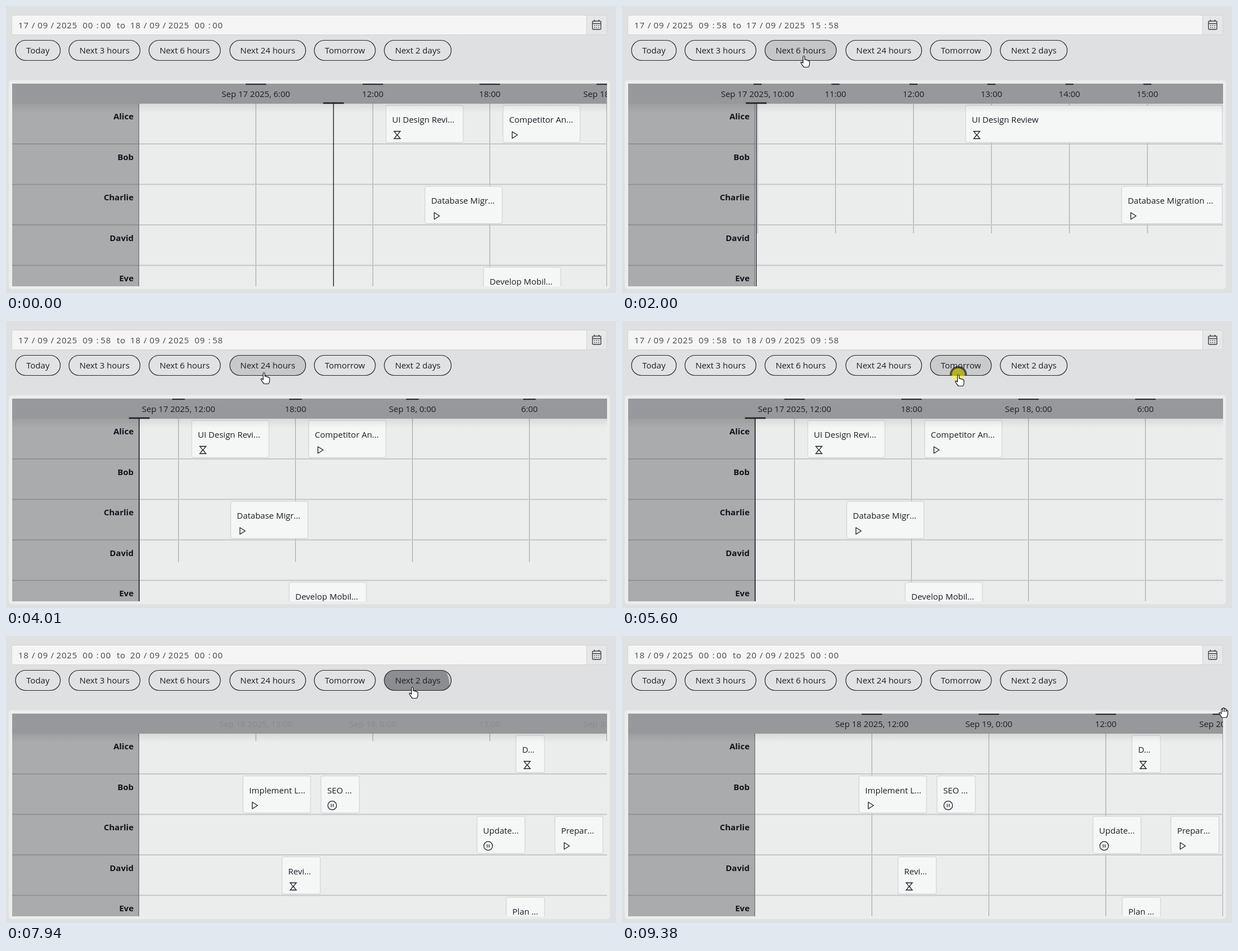
These frames come from a looping animation (1090 px wide and 514 px high, 9.45 s). An HTML page with a canvas:

```html
<!DOCTYPE html>
<html lang="en">
<head>
<meta charset="utf-8">
<title>Task schedule</title>
<style>
html, body { margin: 0; width: 100%; height: 100%; overflow: hidden; background: #dfe0e2; }
canvas { display: block; }
</style>
</head>
<body>
<canvas id="stage" width="1090" height="514"></canvas>
<script>
const ctx = document.getElementById('stage').getContext('2d');
const LOOP = 9450, LEFT = 237.5, RIGHT = 1073.5, TOP = 174.5, ROW = 72.5, BOTTOM = 502;
const INK = '#1c1e26', FONT = '"Open Sans", "Noto Sans", sans-serif';
const NOW = 9 + 59 / 60, START = 9 + 58 / 60;

const people = ['Alice', 'Bob', 'Charlie', 'David', 'Eve'];
const buttons = [
  [17, 80, 'Today'], [112.5, 127, 'Next 3 hours'], [255.5, 127.5, 'Next 6 hours'],
  [400, 135.5, 'Next 24 hours'], [551, 109, 'Tomorrow'], [676, 119.5, 'Next 2 days']
];
// Hours count from 17 September, 0:00
const views = [
  { start: 0, span: 24, step: 6 },
  { start: START, span: 6, step: 1 },
  { start: START, span: 24, step: 6 },
  { start: 24, span: 24, step: 6 },
  { start: 24, span: 48, step: 12 }
];
// row, start, length, icon, label in a day view, label in other views
const tasks = [
  [0, 12, 4, 'wait', 'UI Design Revi...', 'UI Design Review'],
  [0, 18, 4, 'play', 'Competitor An...'],
  [2, 14, 4, 'play', 'Database Migr...', 'Database Migration ...'],
  [4, 17, 4, 'play', 'Develop Mobil...'],
  [1, 34, 7, 'play', 'Implement Login Feature', 'Implement L...'],
  [1, 42, 4, 'pause', 'SEO Optimizat...', 'SEO ...'],
  [3, 38, 4, 'wait', 'Review UI Con...', 'Revi...'],
  [0, 62, 3, 'wait', '', 'D...'],
  [2, 58, 5, 'pause', '', 'Update...'],
  [2, 66, 5, 'play', '', 'Prepar...'],
  [4, 61, 4, 'wait', '', 'Plan ...']
];
const clicks = [1643, 3613, 5580, 7850];
const UPDATE_DELAY = 77;
// begin, end, from, bend, to, exponent of the ease-out
const moves = [
  [70, 980, [1065, 298], [930, 150], [768, 107], 1],
  [980, 1260, [768, 107], [540, 102], [325, 89], 1.5],
  [2520, 3470, [325, 89], [390, 122], [461, 92], 2],
  [4450, 5400, [461, 92], [530, 112], [601, 96], 2],
  [6850, 7580, [601, 96], [672, 108], [726, 91], 2],
  [8720, 9380, [726, 91], [950, 200], [1075, 137], 1.5]
];
const icons = {
  play: new Path2D('M-3.5 -6L6 0L-3.5 6Z'),
  wait: new Path2D('M-6.5 -6.5H6.5M-6.5 6.5H6.5M-4.5 -6.5C-4.5 -2 4.5 2 4.5 6.5M4.5 -6.5C4.5 -2 -4.5 2 -4.5 6.5'),
  pause: new Path2D('M7.8 0A7.8 7.8 0 1 1 -7.8 0A7.8 7.8 0 1 1 7.8 0M-1.7 -2.8V2.8M1.7 -2.8V2.8'),
  calendar: new Path2D('M-5.5 -7H5.5Q7.5 -7 7.5 -5V6Q7.5 8 5.5 8H-5.5Q-7.5 8 -7.5 6V-5Q-7.5 -7 -5.5 -7ZM-7.5 -2.5H7.5M-4 -9.5V-6M4 -9.5V-6M-4.5 1.3H-3M-.8 1.3H.8M3 1.3H4.5M-4.5 4.8H-3M-.8 4.8H.8M3 4.8H4.5')
};
const cursors = {
  arrow: new Path2D('M0 0V15L3.5 11.7L6 17L8.3 16L6 11H10.5Z'),
  point: new Path2D('M-1.5 1.5Q0 -1 1.5 1.5V7Q3.5 6 4.5 8Q6.5 7 7.5 9Q10 8.5 10 11V15Q10 18 8 20.5H0Q-3 17 -5.5 12.5Q-5 10 -1.5 13Z'),
  grab: new Path2D('M-4 2V-5.5Q-2.8 -8 -1.3 -5.8V-7.3Q0 -9.5 1.6 -7.3V-6Q3.2 -8 4.6 -5.5V-3.5Q6.2 -5 7.5 -3V3Q7 7 5 9H-3Q-6 5 -8 1Q-7.5 -1.5 -4 2ZM-1.3 -5.8V-1M1.6 -6V-1M4.6 -5V-1')
};

const clamp = v => Math.max(0, Math.min(1, v));
const pad = n => String(n).padStart(2, '0');

function rect(x, y, w, h, color) {
  ctx.fillStyle = color;
  ctx.fillRect(x, y, w, h);
}

function box(x, y, w, h, r, fill, stroke, width = 1) {
  ctx.beginPath();
  ctx.roundRect(x, y, w, h, r);
  if (fill) { ctx.fillStyle = fill; ctx.fill(); }
  if (stroke) { ctx.strokeStyle = stroke; ctx.lineWidth = width; ctx.stroke(); }
}

function text(s, x, y, align = 'left', color = INK, weight = 400) {
  ctx.font = `${weight} 15px ${FONT}`;
  ctx.textAlign = align;
  ctx.fillStyle = color;
  ctx.fillText(s, x, y);
}

function shape(path, x, y, width, fill, stroke = INK) {
  ctx.save();
  ctx.translate(x, y);
  ctx.lineJoin = 'round';
  if (fill) { ctx.fillStyle = fill; ctx.fill(path); }
  ctx.strokeStyle = stroke;
  ctx.lineWidth = width;
  ctx.stroke(path);
  ctx.restore();
}

function disc(x, y, r, color) {
  ctx.beginPath();
  ctx.arc(x, y, r, 0, 7);
  ctx.fillStyle = color;
  ctx.fill();
}

function cursorAt(t) {
  if (t < 70) return [-99, -99];
  const [a, b, from, bend, to, power] = moves.findLast(m => t >= m[0]);
  const u = 1 - (1 - clamp((t - a) / (b - a))) ** power, v = 1 - u;
  return from.map((p, i) => v * v * p + 2 * u * v * bend[i] + u * u * to[i]);
}

const isOver = ([x, y], bx, by, w, h) => x >= bx && x <= bx + w && y >= by && y <= by + h;

function drawDate(hours, x) {
  const minutes = Math.round(hours * 60), hour = Math.floor(minutes / 60);
  const parts = [17 + Math.floor(hour / 24), '/', '09', '/', '2025', pad(hour % 24), ':', pad(minutes % 60)];
  const offsets = [0, 24, 34.5, 58, 68, 115, 139.5, 147];
  parts.forEach((p, i) => text(p, x + offsets[i], 39.5, 'left', '#43454a'));
}

function drawToolbar(view, t, pos) {
  box(10.5, 16.5, 1063, 35, 3, '#f5f5f5', '#d3d4d6');
  box(1037.5, 16.5, 36, 35, [0, 3, 3, 0], '#e6e7e8', '#d3d4d6');
  shape(icons.calendar, 1055.5, 34, 1.4, null, '#3c3e44');
  ctx.letterSpacing = '0.8px';
  drawDate(view.start, 22);
  text('to', 198, 39.5, 'left', '#43454a');
  drawDate(view.start + view.span, 222);
  ctx.letterSpacing = '0px';

  for (const [x, w, label] of buttons) {
    const hover = isOver(pos, x, 61.5, w, 36);
    box(x, 61.5, w, 36, 18, hover ? '#cacbcc' : '#e1e2e3');
    const click = clicks.findLast(c => t >= c);
    if (hover && click) {
      const age = t - click;
      ctx.save();
      ctx.clip();
      disc(...pos, 0.73 * age, `rgba(22,24,31,${0.86 * Math.exp(-age / 100)})`);
      ctx.restore();
    }
    box(x, 61.5, w, 36, 18, null, '#24272e', 1.2);
    text(label, x + w / 2, 85, 'center');
  }
}

function drawTask([row, hour, length, icon, dayLabel, label], view, toX) {
  const start = hour + 2 / 3, end = view.start + view.span;
  if (start < view.start || start >= end) return;
  const x = toX(start) + 0.3, y = TOP + row * ROW + 3.5;
  const w = toX(Math.min(start + length, end)) - x - 1;
  box(x, y, w, 66.5, 3, '#f5f6f6', '#cdcecf');
  text(view.span === 24 ? dayLabel : label, x + 11, y + 31);
  shape(icons[icon], x + 20, y + 53, 1.3);
}

function drawChart(view, age) {
  const end = view.start + view.span;
  const toX = h => LEFT + (h - view.start) / view.span * (RIGHT - LEFT);
  const growth = 1 - (1 - clamp(age / 500)) ** 1.5;
  const tickWidth = 36.5 * clamp((age - 209) / 182);
  const labelAlpha = clamp(age / 140);

  box(5, 133, 1074, 374, 5, '#eceeee', '#e6e7e8');
  ctx.save();
  ctx.beginPath();
  ctx.rect(11, 139, 1063, BOTTOM - 139);
  ctx.clip();
  rect(11, 139, 1063, 363, '#ebeded');
  rect(11, TOP, 226.5, 328, '#aaabad');

  const marks = [];
  for (let h = (Math.floor(view.start / view.step) + 1) * view.step; h <= end; h += view.step) marks.push(h);
  for (const h of marks) rect(toX(h) - 0.6, TOP, 1.2, growth * (BOTTOM - TOP), 'rgba(30,34,40,.33)');

  people.forEach((name, i) => {
    const y = TOP + i * ROW;
    if (i) {
      rect(11, y - 0.8, 226, 1.6, '#8b8c8f');
      rect(LEFT, y - 1, 836.5, 2, '#c5c6c7');
    }
    text(name, 228, y + 28.5, 'right', '#13151d', 700);
  });
  rect(236.7, TOP, 1.2, 328, '#6d6e72');

  const showNow = NOW >= view.start && NOW <= end, nowX = toX(NOW);
  if (showNow) rect(nowX - 0.7, TOP, 1.4, 328, INK);
  for (const task of tasks) drawTask(task, view, toX);

  const shade = ctx.createLinearGradient(0, 175, 0, 191);
  shade.addColorStop(0, 'rgba(0,0,0,.08)');
  shade.addColorStop(1, 'rgba(0,0,0,0)');
  rect(11, 175, 1063, 16, shade);
  rect(11, 139, 1063, 36, '#97989b');

  marks.forEach((h, i) => {
    const x = toX(h), day = 17 + Math.floor(h / 24), time = `${h % 24}:00`;
    const date = i === 0 ? `Sep ${day} 2025, ` : h % 24 === 0 ? `Sep ${day}, ` : '';
    ctx.globalAlpha = labelAlpha;
    text(date + time, x, 163, 'center');
    ctx.globalAlpha = 1;
    rect(x - tickWidth / 2, 139, tickWidth, 2.2, '#2c2e38');
  });
  if (showNow) rect(nowX - 18.5, 172.6, 37, 2.6, INK);
  ctx.restore();
}

function draw(t) {
  const pos = cursorAt(t);
  const updates = clicks.map(c => c + UPDATE_DELAY).filter(u => t >= u);
  const view = views[updates.length];
  const age = updates.length ? t - updates.at(-1) : Infinity;

  rect(0, 0, 1090, 514, '#dfe0e2');
  drawToolbar(view, t, pos);
  drawChart(view, age);

  if (clicks.some(c => t >= c - 55 && t < c + 60)) disc(...pos, 11.5, 'rgba(255,250,0,.58)');
  const kind = buttons.some(([x, w]) => isOver(pos, x, 61.5, w, 36)) ? 'point'
    : isOver(pos, 5, 133, 1074, 374) ? 'grab' : 'arrow';
  shape(cursors[kind], ...pos, 1.2, '#fff', '#111');
}

function frame(now) {
  draw(now % LOOP);
  requestAnimationFrame(frame);
}
requestAnimationFrame(frame);
</script>
</body>
</html>
```
